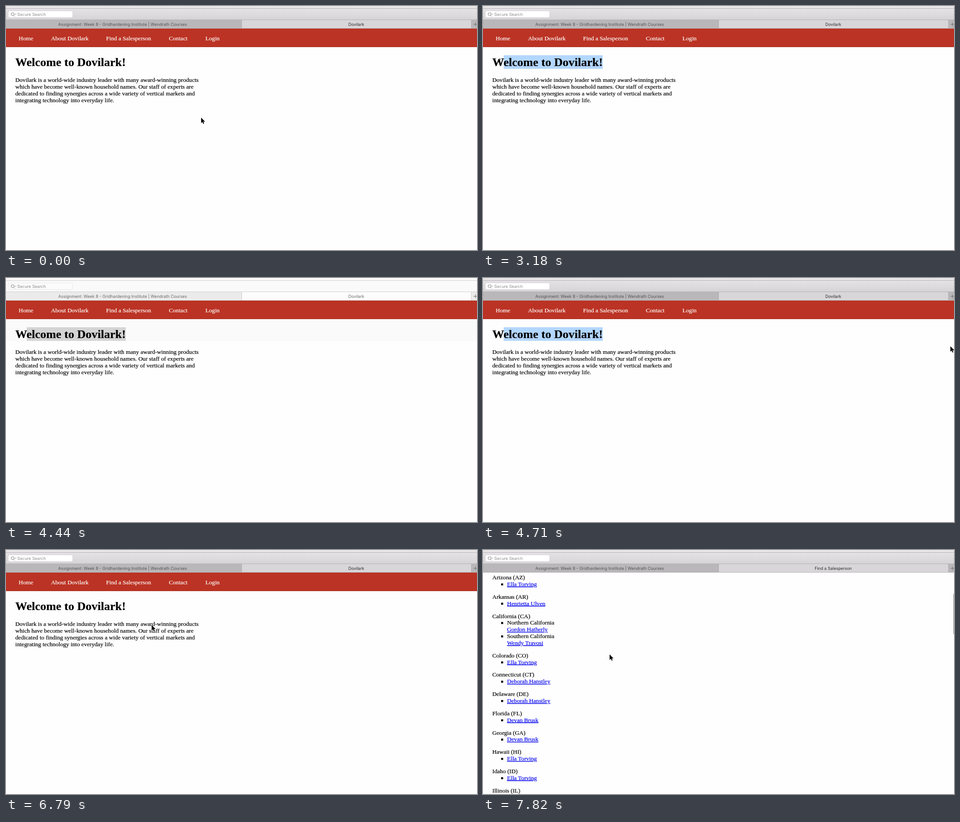
Write an HTML page that moves like this. It is 1038 px wide and 540 px high and loops after 7.99 s.

```html
<!DOCTYPE html>
<html lang="en">
<head>
<meta charset="utf-8">
<title>Dovilark</title>
<style>
  html, body { margin: 0; width: 100%; height: 100%; overflow: hidden; background: #fefefe; }
  svg { display: block; }
  text { white-space: pre; fill: currentColor; }

  #page { font: 13.15px "Liberation Serif", serif; color: #000; }
  #page text { stroke: currentColor; stroke-width: .2px; }
  #page .title { font-size: 26.1px; font-weight: bold; }
  #page .link { color: #0000ee; text-decoration: underline; }
  #nav { color: #fff; }
  #sel { fill: #b3d7ff; }
  #band { fill: none; }

  #chrome {
    --top: #e8e6e8; --low: #d5d3d5; --tab: #b9b7b9; --active: #d8d6d8;
    --line: #b4b2b4; --field: #fff; --edge: #cfcdcf; --title: #2b2b2b;
    font: 9.1px Inter, sans-serif;
    color: #555;
  }
  #chrome .hint { color: #8d8d8d; }
  #tab { color: var(--title); }
  .idle #chrome {
    --top: #fafafa; --low: #fafafa; --tab: #ebebeb; --active: #fcfcfc;
    --line: #cecece; --field: #fbfbfb; --edge: #e2e2e2; --title: #6a6a6a;
    color: #6a6a6a;
  }
  .idle #sel { fill: #d4d4d4; }
  .idle #band { fill: #fafafa; }
</style>
</head>
<body>
<svg id="stage" width="1038" height="540" viewBox="0 0 1038 540">
  <g id="page">
    <rect id="band" y="91" width="1038" height="49"/>
    <g id="nav">
      <rect y="50" width="1038" height="41" fill="#bb3324"/>
      <path d="M0 90.5H1038" stroke="#ad2f21"/>
      <text x="28" y="75.5">Home</text>
      <text x="99.3" y="75.5">About Dovilark</text>
      <text x="220.5" y="75.5">Find a Salesperson</text>
      <text x="359" y="75.5">Contact</text>
      <text x="439.5" y="75.5">Login</text>
    </g>
    <g id="home">
      <rect id="sel" y="109" height="30"/>
      <text class="title" x="20.5" y="132.7">Welcome to Dovilark!</text>
    </g>
    <g id="sales">
      <text class="title" x="20.5" y="132.7">Find a Salesperson</text>
      <text x="20.5" y="168">Let one of our experienced salespeople help you to find a solution for your needs. Locate your territory below to contact your regional salesperson today.</text>
    </g>
  </g>
  <rect id="thumb" x="1037" width="4" height="89" fill="#6f6f6f"/>

  <g id="chrome">
    <linearGradient id="bar" x2="0" y2="1">
      <stop offset="0" style="stop-color: var(--top)"/>
      <stop offset="1" style="stop-color: var(--low)"/>
    </linearGradient>
    <rect width="1038" height="31" fill="url(#bar)"/>
    <rect y="31" width="1038" height="19" fill="var(--tab)"/>
    <rect x="519" y="31" width="506" height="19" fill="var(--active)"/>
    <path d="M0 5.5H1038M0 30.5H1038M0 49.5H1038M519.5 31V50M1025.5 31V50" fill="none" stroke="var(--line)"/>
    <path d="M1030.5 40.5H1039M1034.5 36.5V44.5" stroke="#6b6b6b"/>
    <rect x="5" y="10.8" width="142" height="15" rx="3" fill="var(--field)" stroke="var(--edge)" stroke-width=".8"/>
    <g fill="none" stroke="#7c7c7c">
      <circle cx="14.5" cy="18" r="3.3"/>
      <path d="M17 20.5L19.6 23.2M19 17.2L20.7 18.9L22.4 17.2"/>
    </g>
    <text class="hint" x="24.8" y="22">Secure Search</text>
    <text x="257" y="43.7" text-anchor="middle">Assignment: Week 8 - Gridhardening Institute | Wendrath Courses</text>
    <text id="tab" x="772" y="43.7" text-anchor="middle"></text>
  </g>

  <g id="pointer">
    <path id="arrow" d="M0 0V12.2L2.8 9.6L4.6 14L6.6 13.1L4.8 8.9H8.6Z" stroke="#fff" stroke-width="1.4" paint-order="stroke"/>
    <path id="beam" d="M-2.5 -7Q0 -7 0 -5V5Q0 7 -2.5 7M2.5 -7Q0 -7 0 -5V5Q0 7 2.5 7M-1.5 2H1.5" fill="none" stroke="#444"/>
    <path id="hand" d="M0 1Q0 -.5 1.2 -.5T2.4 1V5Q5 4.5 5.5 5.5Q8 5 8.2 6.5Q10.3 6.2 10.3 8V10.5L8.8 14H2L-2.4 8.6Q-2.6 7 -1 7.3L0 8.3Z" fill="#fff" stroke="#000" stroke-width=".9"/>
  </g>
</svg>

<script>
const LOOP = 7990;
const LINE = 14.85;
const $ = id => document.getElementById(id);

function add(parent, tag, attrs, content = "") {
  const el = document.createElementNS("http://www.w3.org/2000/svg", tag);
  for (const [name, value] of Object.entries(attrs)) el.setAttribute(name, value);
  el.textContent = content;
  parent.append(el);
}

[
  "Dovilark is a world-wide industry leader with many award-winning products",
  "which have become well-known household names. Our staff of experts are",
  "dedicated to finding synergies across a wide variety of vertical markets and",
  "integrating technology into everyday life."
].forEach((line, i) => add($("home"), "text", { x: 20.5, y: 168 + i * LINE }, line));

const ella = "Ella Torving", deb = "Deborah Hanstley", dev = "Devan Brusk";
const states = [
  ["Alabama (AL)", dev], ["Alaska (AK)", ella], ["Arizona (AZ)", ella],
  ["Arkansas (AR)", "Henrietta Ulven"],
  ["California (CA)", ["Northern California", "Gordon Hatherly"], ["Southern California", "Wendy Travosi"]],
  ["Colorado (CO)", ella], ["Connecticut (CT)", deb], ["Delaware (DE)", deb],
  ["Florida (FL)", dev], ["Georgia (GA)", dev], ["Hawaii (HI)", ella],
  ["Idaho (ID)", ella], ["Illinois (IL)", dev]
];
const list = $("sales");
let y = 195.7;
for (const [state, ...entries] of states) {
  add(list, "text", { x: 20.5, y }, state);
  for (const entry of entries) {
    const [person, area] = [entry].flat().reverse();
    add(list, "rect", { x: 40, y: y + LINE - 6, width: 4.4, height: 4.4 });
    if (area) add(list, "text", { x: 53, y: y += LINE }, area);
    add(list, "text", { x: 53, y: y += LINE, class: "link" }, person);
  }
  y += LINE + 13;
}

// Pointer: start time, shape, x, y
const moves = [
  [0, "arrow", 430, 247], [300, "arrow", 330, 180], [480, "beam", 257, 132],
  [930, "beam", 310, 125], [1080, "beam", 270, 124], [1230, "beam", 221, 124],
  [1380, "beam", 138, 123], [1530, "beam", 77, 122], [1680, "beam", 39.5, 122],
  [3180, "beam", 37.5, 123.5], [3480, "arrow", 822, 475], [3780, "arrow", 890, 507],
  [3930, "arrow", 935, 526], [4080, "arrow", 960, 535], [4260, ""],
  [4710, "arrow", 1030, 151], [4860, "arrow", 640, 146], [5010, "beam", 290, 132],
  [5160, "beam", 138, 126], [5310, "arrow", -4, 120],
  [5460, "beam", 40, 126], [5610, "beam", 180, 132], [5760, "arrow", 290, 146],
  [6050, "arrow", 302, 138], [6200, "arrow", 306, 106], [6350, "hand", 307, 75],
  [6640, "arrow", 314, 122], [6790, "arrow", 321, 166], [6940, "arrow", 310, 200],
  [7090, "arrow", 296, 222], [7230, "arrow", 285, 229], [7380, "arrow", 279, 231]
];
// Left edge of the highlighted heading text, which always ends at SEL_END
const SEL_END = 264;
const selection = [
  [0, SEL_END], [1230, 222], [1380, 138], [1530, 77], [1680, 45.6],
  [5010, SEL_END], [5160, 138], [5310, 20.5], [6050, SEL_END]
];
const scrolls = [[0, 0], [7670, 70], [7820, 216]];

const at = (track, t) => track.findLast(step => step[0] <= t);
const show = (id, on) => $(id).style.display = on ? "" : "none";

function draw(t) {
  const [, shape, px = 0, py = 0] = at(moves, t);
  $("pointer").setAttribute("transform", `translate(${px} ${py})`);
  for (const id of ["arrow", "beam", "hand"]) show(id, id === shape);

  const left = at(selection, t)[1];
  $("sel").setAttribute("x", left);
  $("sel").setAttribute("width", SEL_END - left);

  const loaded = t >= 6940;
  show("home", !loaded);
  show("sales", loaded);
  $("tab").textContent = loaded ? "Find a Salesperson" : "Dovilark";
  $("stage").classList.toggle("idle", t >= 4260 && t < 4710);

  const scroll = at(scrolls, t)[1];
  $("page").setAttribute("transform", `translate(0 ${-scroll})`);
  show("thumb", scroll > 0);
  $("thumb").setAttribute("y", 50 + scroll * 0.218);
}

const start = performance.now();
function tick() {
  draw((performance.now() - start) % LOOP);
  requestAnimationFrame(tick);
}
tick();
</script>
</body>
</html>
```
